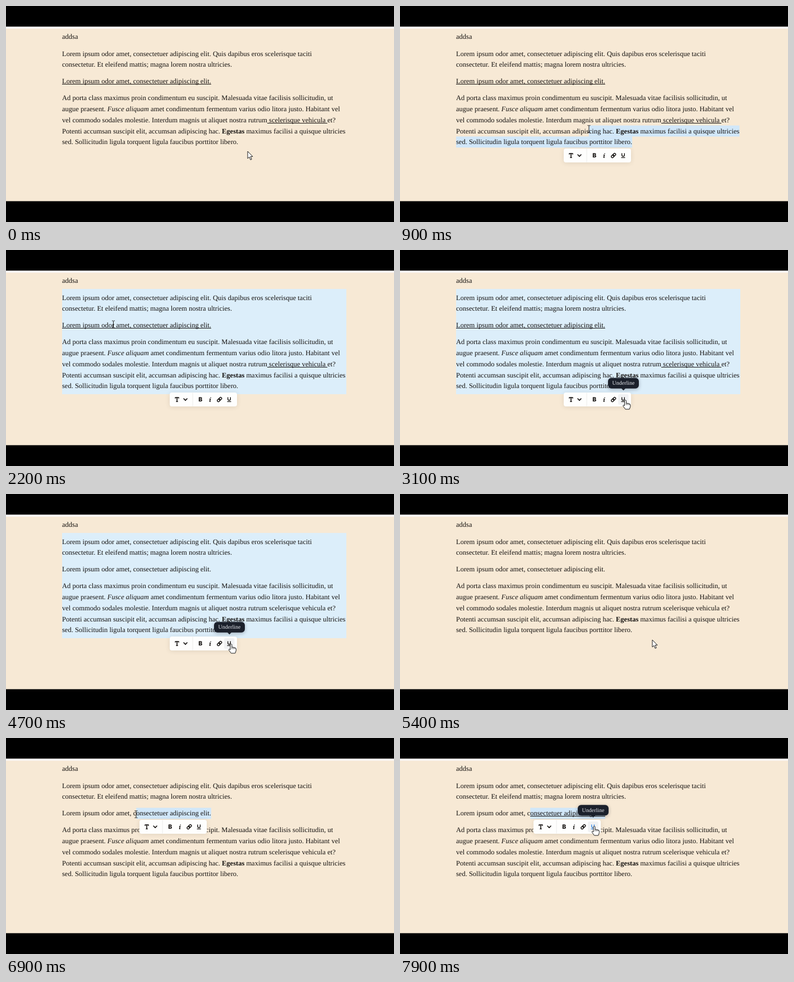
An HTML page with a canvas that plays this animation: 692 by 388 pixels, repeating every 8000 ms.

```html
<!DOCTYPE html>
<html lang="en">
<head>
<meta charset="utf-8">
<title>Text editor: underline tool</title>
<style>
html, body { margin: 0; width: 100%; height: 100%; overflow: hidden; background: #000; }
canvas { display: block; width: 692px; height: 388px; }
</style>
</head>
<body>
<canvas id="stage"></canvas>
<script>
const W = 692, H = 388, LOOP = 8000, STEP = 100;
const canvas = document.getElementById('stage');
const ctx = canvas.getContext('2d');
const dpr = window.devicePixelRatio || 1;
canvas.width = W * dpr;
canvas.height = H * dpr;

const LEFT = 100, SIZE = 12.51;
const INK = '#14110f', PAPER = '#f7e9d5', BLUE = '#388ae5';
const SERIF = '"Liberation Serif", serif';

// Each run: text, font style, whether it starts out underlined
const lines = [
  { y: 59.4, runs: [['addsa']] },
  { y: 89.5, runs: [['Lorem ipsum odor amet, consectetuer adipiscing elit. Quis dapibus eros scelerisque taciti']] },
  { y: 109.2, runs: [['consectetur. Et eleifend mattis; magna lorem nostra ultricies.']] },
  { y: 139.3, runs: [['Lorem ipsum odor amet, consectetuer adipiscing elit.', '', true]] },
  { y: 169.1, runs: [['Ad porta class maximus proin condimentum eu suscipit. Malesuada vitae facilisis sollicitudin, ut']] },
  { y: 188.9, runs: [['augue praesent. '], ['Fusce aliquam', 'italic'], [' amet condimentum fermentum varius odio litora justo. Habitant vel']] },
  { y: 208.7, runs: [['vel commodo sodales molestie. Interdum magnis ut aliquet nostra rutrum'], [' scelerisque vehicula ', '', true], ['et?']] },
  { y: 228.5, runs: [['Potenti accumsan suscipit elit, accumsan adipiscing hac. '], ['Egestas', 'bold'], [' maximus facilisi a quisque ultricies']] },
  { y: 248.3, runs: [['sed. Sollicitudin ligula torquent ligula faucibus porttitor libero.']] }
];

// Pointer path: time, x, y, shape
const path = [
  [0, 431, 261, 'arrow'], [100, 424, 254, 'arrow'], [200, 414, 245, 'beam'],
  [600, 413, 245, 'beam'], [800, 372, 236, 'beam'], [1000, 302, 206, 'beam'],
  [1200, 234, 174, 'beam'], [1300, 217, 165, 'beam'], [1400, 201, 152, 'beam'],
  [1500, 190, 138, 'beam'], [1700, 184, 106, 'beam'], [1900, 183, 92, 'beam'],
  [2200, 191.5, 133.5, 'beam'], [2400, 208, 160, 'beam'], [2700, 330, 247, 'arrow'],
  [2800, 378, 276, 'hand'], [3000, 402, 269.5, 'hand'], [4700, 401.5, 269.5, 'hand'],
  [5000, 402, 270, 'arrow'], [5200, 452, 285, 'arrow'], [5400, 450, 262, 'arrow'],
  [5500, 432, 225, 'beam'], [5900, 370, 145, 'beam'], [6100, 366, 142, 'beam'],
  [6400, 366, 138, 'beam'], [6900, 232, 137, 'beam'], [7000, 236, 140, 'beam'],
  [7200, 325, 158, 'hand'], [7400, 346.5, 158.5, 'hand'], [8000, 346.5, 158.5, 'hand']
];

function pointerAt(t) {
  let i = 0;
  while (i < path.length - 2 && path[i + 1][0] <= t) i++;
  const a = path[i], b = path[i + 1];
  const k = (t - a[0]) / (b[0] - a[0]);
  return { x: a[1] + (b[1] - a[1]) * k, y: a[2] + (b[2] - a[2]) * k, shape: a[3] };
}

function setFont(style = '') {
  ctx.font = `${style} ${SIZE}px ${SERIF}`;
}

function lineWidth(line) {
  return line.runs.reduce((sum, [text, style]) => {
    setFont(style);
    return sum + ctx.measureText(text).width;
  }, 0);
}

// Nearest gap between characters to a given x
function snap(line, x) {
  let best = LEFT, start = LEFT;
  for (const [text, style] of line.runs) {
    setFont(style);
    for (let i = 1; i <= text.length; i++) {
      const gap = start + ctx.measureText(text.slice(0, i)).width;
      if (Math.abs(gap - x) < Math.abs(best - x)) best = gap;
    }
    start += ctx.measureText(text).width;
  }
  return best;
}

function fill(color, x, y, w, h) {
  ctx.fillStyle = color;
  ctx.fillRect(x, y, w, h);
}

function box(color, x, y, w, h, r) {
  ctx.fillStyle = color;
  ctx.beginPath();
  ctx.roundRect(x, y, w, h, r);
  ctx.fill();
}

function stroke(points, color = INK, width = 1.6) {
  ctx.strokeStyle = color;
  ctx.lineWidth = width;
  ctx.beginPath();
  points.forEach(([x, y], i) => i ? ctx.lineTo(x, y) : ctx.moveTo(x, y));
  ctx.stroke();
}

function underline(line, x, w) {
  fill(INK, x, Math.round(line.y + 1), w, 1);
}

function drawLine(line, mode) {
  let x = LEFT;
  for (const [text, style, under] of line.runs) {
    setFont(style);
    const w = ctx.measureText(text).width;
    ctx.fillStyle = INK;
    ctx.fillText(text, x, line.y);
    if (mode === 'all' || (mode === 'some' && under)) underline(line, x, w);
    x += w;
  }
}

function selectLine(line, from, to = LEFT + lineWidth(line)) {
  fill('#d1e7f9', from, line.y - 13.9, to - from, 19.9);
}

function drawDragSelection(p) {
  const first = Math.max(4, lines.findIndex(l => p.y < l.y + 5.9));
  lines.slice(first).forEach((line, i) => selectLine(line, i ? LEFT : snap(line, p.x)));
}

function drawBlockSelection(t) {
  const top = t < 1700 ? 121 : 70;
  fill('#dceefa', LEFT, top, 507, 259 - top);
}

function drawHandles(y) {
  stroke([[61, y], [70, y]]);
  stroke([[65.5, y - 4.5], [65.5, y + 4.5]]);
  for (const x of [85, 89])
    for (const dy of [-3.6, 0, 3.6]) box(INK, x - 1, y + dy - 1, 2, 2, 0.8);
}

function drawLink(x, y) {
  ctx.save();
  ctx.translate(x, y);
  ctx.rotate(-Math.PI / 4);
  ctx.strokeStyle = INK;
  ctx.lineWidth = 1.4;
  for (const dx of [-4.8, -0.8]) {
    ctx.beginPath();
    ctx.roundRect(dx, -2, 5.5, 4, 2);
    ctx.stroke();
  }
  ctx.restore();
}

function drawToolbar(cx, cy, hover, active) {
  ctx.save();
  ctx.shadowColor = 'rgba(60,50,30,0.12)';
  ctx.shadowBlur = 8 * dpr;
  ctx.shadowOffsetY = 1 * dpr;
  box('#fefefd', cx - 60, cy - 12.5, 120, 25, 4);
  ctx.restore();
  ctx.save();
  ctx.translate(cx, cy);
  ctx.lineCap = ctx.lineJoin = 'round';
  fill('#ececea', -19.5, -12, 1, 24);
  if (hover) box('#f1f2f3', 37, -9.5, 18.5, 19, 3);
  stroke([[-50, -2.4], [-50, -3.5], [-44, -3.5], [-44, -2.4]]);
  stroke([[-47, -3.5], [-47, 3.7]]);
  stroke([[-48.3, 3.8], [-45.7, 3.8]], INK, 1.3);
  stroke([[-35, -1.5], [-32, 1.6], [-29, -1.5]]);
  ctx.fillStyle = INK;
  ctx.font = '800 10.5px Inter, sans-serif';
  ctx.textAlign = 'center';
  ctx.fillText('B', -5.3, 3.8);
  stroke([[12.5, -0.8], [11.3, 3.5], [12.4, 3.5]], INK, 1.4);
  stroke([[11.3, -0.8], [12.5, -0.8]], INK, 1.2);
  box(INK, 12.2, -4.1, 1.7, 1.7, 0.8);
  drawLink(28.8, 0);
  const color = active ? BLUE : INK;
  ctx.strokeStyle = color;
  ctx.lineWidth = 1.4;
  ctx.beginPath();
  ctx.moveTo(43.7, -3.6);
  ctx.lineTo(43.7, -0.8);
  ctx.arc(46, -0.8, 2.3, Math.PI, 0, true);
  ctx.lineTo(48.3, -3.6);
  ctx.stroke();
  stroke([[43, 3.9], [49, 3.9]], color, 1.2);
  ctx.restore();
}

function drawTooltip(cx, cy) {
  ctx.save();
  ctx.shadowColor = 'rgba(20,24,35,0.3)';
  ctx.shadowBlur = 6 * dpr;
  ctx.shadowOffsetY = 1.5 * dpr;
  box('#1b202b', cx - 27.5, cy - 9.5, 55, 19, 6);
  ctx.restore();
  ctx.fillStyle = '#1b202b';
  ctx.beginPath();
  ctx.moveTo(cx - 4, cy + 9);
  ctx.lineTo(cx, cy + 13);
  ctx.lineTo(cx + 4, cy + 9);
  ctx.fill();
  ctx.fillStyle = '#e4e6ec';
  ctx.font = `10px ${SERIF}`;
  ctx.textAlign = 'center';
  ctx.fillText('Underline', cx, cy + 3);
  ctx.textAlign = 'left';
}

const shapes = {
  arrow: new Path2D('M0 0V13L3 10.2L5 15.3L7.2 14.4L5.1 9.4H9Z'),
  hand: new Path2D('M-1.5 .8Q0-.7 1.4.8V6Q3 4.8 3.9 6.3Q5.6 5.4 6.4 7Q8.6 6.5 8.8 8.5V12L7.2 16.5H0L-4 11Q-4.6 9-2.8 9.2L-1.5 10.3Z'),
  beam: new Path2D('M-2.5-6.3H-.8L0-5.6L.8-6.3H2.5M0-5.6V5.6M-2.5 6.3H-.8L0 5.6L.8 6.3H2.5')
};

function drawPointer({ x, y, shape }) {
  ctx.save();
  ctx.translate(x, y);
  ctx.strokeStyle = '#1c1c1c';
  ctx.lineWidth = 1;
  ctx.lineJoin = 'round';
  if (shape !== 'beam') {
    ctx.fillStyle = '#fff';
    ctx.fill(shapes[shape]);
  }
  ctx.stroke(shapes[shape]);
  if (shape === 'hand') {
    for (const fx of [1.4, 3.9, 6.4]) stroke([[fx, 6], [fx, 9]], '#1c1c1c', 0.8);
  }
  ctx.restore();
}

function draw(t) {
  const within = (from, to) => t >= from && t < to;
  const p = pointerAt(t);
  ctx.setTransform(dpr, 0, 0, dpr, 0, 0);
  ctx.textRendering = 'geometricPrecision';
  fill('#000', 0, 0, W, H);
  fill(PAPER, 0, 37, W, 313.6);
  fill('#fffaf6', 0, 37, W, 4);

  const title = lines[3];
  const titleEnd = LEFT + lineWidth(title);
  let from = titleEnd;
  if (t >= 6500) {
    setFont();
    const edge = LEFT + ctx.measureText('Lorem ipsum odor amet, c').width;
    from = t < 6900 ? snap(title, p.x) : edge;
    selectLine(title, from, titleEnd);
  }
  if (within(700, 1500)) drawDragSelection(p);
  if (within(1500, 5300)) drawBlockSelection(t);

  const allUnder = within(3500, 4300);
  const mode = t < 3500 ? 'some' : allUnder ? 'all' : 'none';
  lines.forEach((line, i) => drawLine(line, i ? mode : 'none'));
  if (t >= 7700) underline(title, from, titleEnd - from);

  if (within(600, 800)) drawHandles(165);
  if (within(5500, 5800)) drawHandles(165);
  if (within(5800, 6600)) drawHandles(135);

  if (within(800, 5300)) {
    const hover = within(3000, 5000);
    drawToolbar(352, 268.5, hover, allUnder);
    if (hover) drawTooltip(398.5, 239.3);
  }
  if (t >= 6700) {
    const hover = t >= 7400;
    drawToolbar((from + titleEnd) / 2 - 1, 159.5, hover, t >= 7700);
    if (hover) drawTooltip(344.5, 129.7);
  }
  drawPointer(p);
}

function tick() {
  const t = performance.now() % LOOP;
  draw(Math.floor(t / STEP) * STEP);
  requestAnimationFrame(tick);
}
tick();
</script>
</body>
</html>
```
